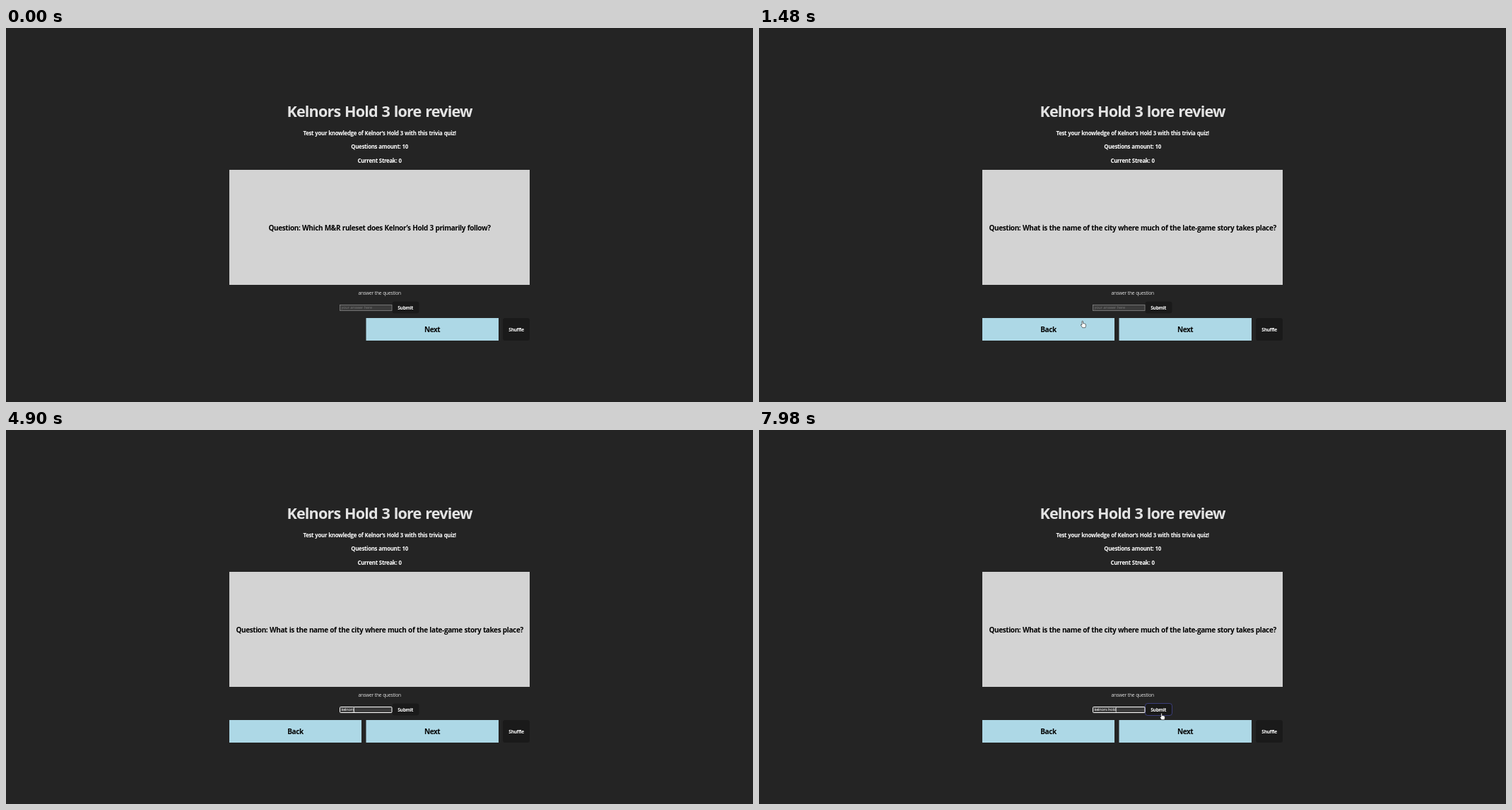
Recreate the animation shown at these times as an HTML page. Size 1057x530 px, loop 8000 ms.

```html
<!DOCTYPE html>
<html lang="en">
<head>
<meta charset="utf-8">
<title>Lore review quiz</title>
<style>
  html, body { margin: 0; width: 100%; height: 100%; overflow: hidden; background: #242424; }
  svg { display: block; width: 100%; height: 100%; }
  text { font-family: "Open Sans", "Noto Sans", sans-serif; letter-spacing: -.039em; word-spacing: .045em; white-space: pre; }
  .mid { text-anchor: middle; }
  .h1 { font-size: 21.6px; font-weight: 700; fill: #e3e3e3; }
  .h2 { font-size: 10px; font-weight: 700; fill: #000; }
  .h3 { font-size: 7.87px; font-weight: 700; fill: #fff; }
  .body { font-size: 6.6px; fill: #e3e3e3; letter-spacing: -.025em; }
  .btn { font-size: 6.6px; font-weight: 700; fill: #fff; }
  .field { font-size: 5.53px; letter-spacing: -.025em; }
  .blue { fill: #add8e6; }
  .dark { fill: #1a1a1a; }
</style>
</head>
<body>
<svg viewBox="0 0 1057 530">
  <rect width="1057" height="530" fill="#242424"/>
  <g class="mid">
    <text class="h1" x="528.5" y="125.8">Kelnors Hold 3 lore review</text>
    <text class="h3" x="528.6" y="151.8">Test your knowledge of Kelnor’s Hold 3 with this trivia quiz!</text>
    <text class="h3" x="528.6" y="171.3">Questions amount: 10</text>
    <text class="h3" x="528.6" y="190.8">Current Streak: 0</text>
    <rect x="316" y="201" width="425" height="163" fill="#d3d3d3"/>
    <text class="h2" id="question" x="528.6" y="286.8"></text>
    <text class="body" x="528.7" y="378.2">answer the question</text>

    <rect class="dark" id="submit" x="546.5" y="387.5" width="38" height="17" rx="3.5" stroke-width=".8" stroke-opacity=".5"/>
    <text class="btn" x="565.2" y="398.6">Submit</text>
    <g id="back">
      <rect class="blue" x="316" y="411" width="187" height="32"/>
      <text class="h2" x="409.5" y="431.3">Back</text>
    </g>
    <rect class="blue" x="509.5" y="411" width="187.5" height="32"/>
    <text class="h2" x="603.1" y="431.3">Next</text>
    <rect id="nextCaret" x="591.2" y="420.7" width=".8" height="13" fill="#111"/>
    <rect class="dark" x="703" y="411" width="38" height="32" rx="3.5"/>
    <text class="btn" x="722.1" y="429.7">Shuffle</text>
  </g>

  <rect id="box" x="472.5" y="392.5" width="73.5" height="8" fill="#3b3b3b"/>
  <text class="field" id="entry" x="474.5" y="398.4"></text>
  <rect id="caret" y="393.3" width=".7" height="6.6" fill="#fff"/>

  <g id="pointer">
    <circle id="click" r="5" fill="#dbe84a" opacity=".9"/>
    <path id="arrow" d="M0 0V8.4L2 6.6L3.4 9.6L4.7 9L3.4 6.1H6Z" fill="#fff" stroke="#000" stroke-width=".5"/>
    <path id="hand" d="M-.8 .4Q0 -.5 .8 .4V3.4Q1.6 2.9 2.2 3.7Q3 3.2 3.5 4.1Q4.5 3.8 4.7 4.8V7.2L4 9.4H0L-2.2 6Q-2.4 5 -1.5 5.1L-.8 5.8Z" fill="#fff" stroke="#000" stroke-width=".55"/>
    <path id="beam" d="M-1.5 -3.6H-.5L0 -3.2L.5 -3.6H1.5M0 -3.2V3.2M-1.5 3.6H-.5L0 3.2L.5 3.6H1.5" fill="none" stroke="#bdbdbd" stroke-width=".7"/>
  </g>
</svg>
<script>
const LOOP = 8000, STEP = 67, BLINK = 530;
const CLICK_NEXT = 940, NEW_QUESTION = 1010, FOCUS = 2500;
const ANSWER = "kelnors hold";
const KEYS = [3640, 3770, 3840, 4440, 4640, 4770, 4900, 6160, 6430, 6500, 6700, 6840];
const QUESTIONS = [
  "Question: Which M&R ruleset does Kelnor’s Hold 3 primarily follow?",
  "Question: What is the name of the city where much of the late-game story takes place?"
];
// time, x, y of the pointer tip
const PATH = [
  [250, 734, 514], [450, 650, 470], [600, 546, 422], [735, 580.7, 427],
  [1005, 580.7, 427], [1220, 530, 465], [1474, 457.7, 415.3], [1675, 404, 424],
  [1750, 404, 424], [2060, 728, 421], [2345, 492, 396], [7660, 492, 396], [7960, 569.6, 401.3]
];

const $ = id => document.getElementById(id);
const show = (id, on) => $(id).setAttribute("visibility", on ? "visible" : "hidden");
const set = (id, attrs) => {
  for (const k in attrs) $(id).setAttribute(k, attrs[k]);
};
const inside = ([x, y], l, t, r, b) => x >= l && x <= r && y >= t && y <= b;
const blinkOn = (t, start) => Math.floor((t - start) / BLINK) % 2 === 0;

function pointerAt(time) {
  const t = Math.max(PATH[0][0], Math.floor(time / STEP) * STEP);
  const i = PATH.findIndex(p => p[0] > t);
  if (i < 0) return PATH[PATH.length - 1].slice(1);
  const [t0, x0, y0] = PATH[i - 1], [t1, x1, y1] = PATH[i];
  const k = (t - t0) / (t1 - t0);
  return [x0 + (x1 - x0) * k, y0 + (y1 - y0) * k];
}

function drawPointer(t, changed) {
  const p = pointerAt(t), visible = t >= 250;
  const overSubmit = inside(p, 547, 387, 585, 405);
  const overField = inside(p, 472, 392, 546, 401);
  const overButton = overSubmit || inside(p, 509, 411, 697, 443) ||
    inside(p, 703, 411, 741, 443) || (changed && inside(p, 316, 411, 503, 443));
  set("pointer", { transform: `translate(${p[0]} ${p[1]})` });
  show("hand", visible && overButton);
  show("beam", visible && overField);
  show("arrow", visible && !overButton && !overField);
  show("click", (t >= CLICK_NEXT && t < NEW_QUESTION) || (t >= FOCUS && t < 2640));
  set("submit", { stroke: visible && overSubmit ? "#646cff" : "none" });
}

function drawField(t) {
  const focused = t >= FOCUS;
  const count = KEYS.filter(k => k <= t).length;
  const entry = $("entry");
  entry.textContent = count ? ANSWER.slice(0, count) : "your answer here";
  set("entry", { fill: count ? "#fff" : "#757575" });
  set("box", focused
    ? { stroke: "#fff", "stroke-width": 1, rx: 1 }
    : { stroke: "#858585", "stroke-width": .8, rx: 0 });
  set("caret", { x: 474.4 + (count ? entry.getComputedTextLength() : 0) });
  show("caret", focused && blinkOn(t, count ? KEYS[count - 1] : FOCUS));
}

function draw(t) {
  const changed = t >= NEW_QUESTION;
  $("question").textContent = QUESTIONS[+changed];
  show("back", changed);
  show("nextCaret", t >= CLICK_NEXT && t < FOCUS && blinkOn(t, CLICK_NEXT));
  drawField(t);
  drawPointer(t, changed);
}

const start = performance.now();
function tick() {
  draw((performance.now() - start) % LOOP);
  requestAnimationFrame(tick);
}
tick();
</script>
</body>
</html>
```
